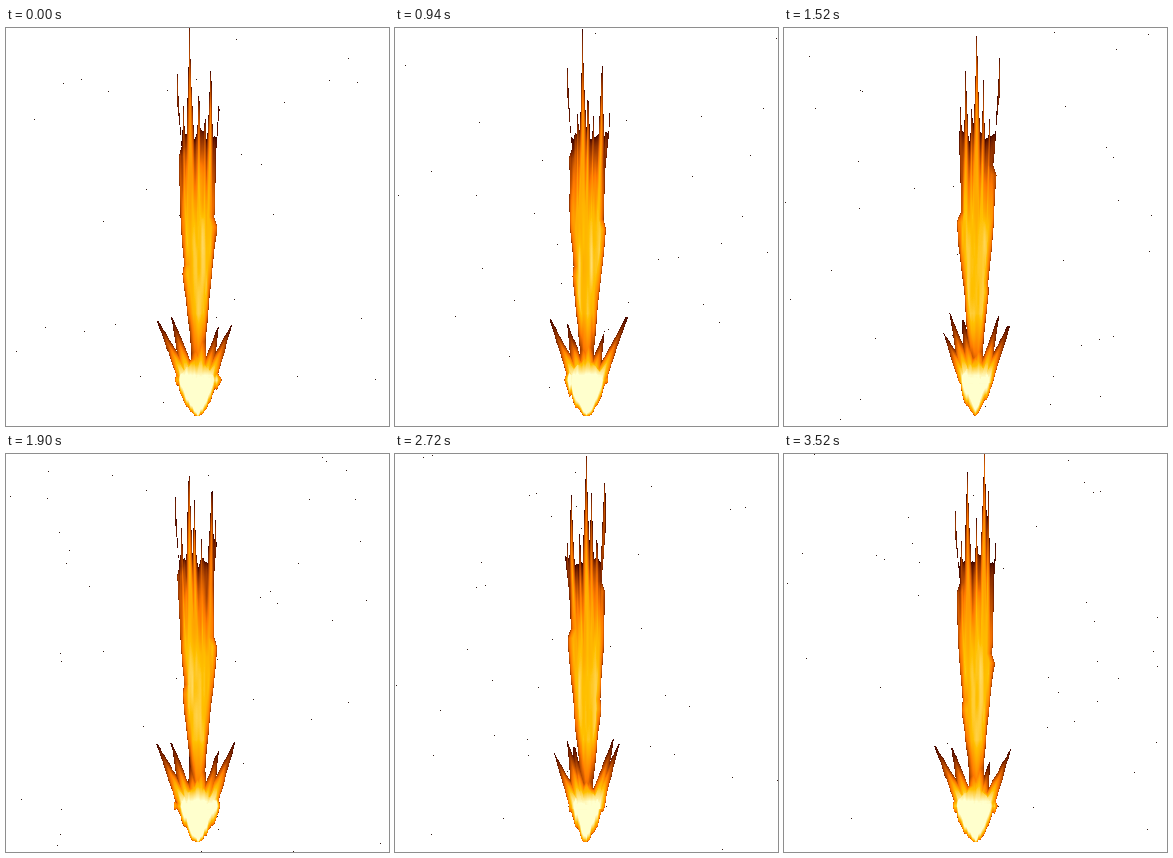
Animation of 383x398 px, one loop 3.54 s. Source, as an HTML page with a canvas:

```html
<!DOCTYPE html>
<html lang="en">
<head>
<meta charset="utf-8">
<title>Fire jet</title>
<style>
  html, body { margin: 0; width: 100%; height: 100%; overflow: hidden; background: #fff; }
  canvas { display: block; }
</style>
</head>
<body>
<canvas width="383" height="398"></canvas>
<script>
const W = 383, H = 398, LOOP = 3540, STEP = 20;
const LIVES = 15, CELLS = 2 * LIVES, CELL = 59;
const AXIS = 191.5, TONGUES = 7, SPIKES = 6;
const ctx = document.querySelector('canvas').getContext('2d');

const clamp = v => Math.max(0, Math.min(1, v));
const mix = (a, b, k) => a + (b - a) * k;
const smooth = k => k * k * (3 - 2 * k);

function hash(a, b) {
  let h = Math.imul(a + 101, 374761393) ^ Math.imul(b + 57, 668265263);
  h = Math.imul(h ^ (h >>> 13), 1274126177);
  return ((h ^ (h >>> 16)) >>> 0) / 4294967296;
}

// Tall, thin streaks that rise and repeat once per loop.
function streak(x, y, t, width) {
  const u = x / width, v = y / CELL + t * CELLS / LOOP;
  const i = Math.floor(u), j = Math.floor(v);
  const a = smooth(u - i), b = smooth(v - j);
  const row = k => mix(hash(i, k % CELLS), hash(i + 1, k % CELLS), a);
  return mix(row(j), row(j + 1), b);
}

// Dark brown through orange and gold to cream.
function colour(heat) {
  const h = clamp(heat);
  return [
    255 * Math.min(1, .2 + 1.55 * h),
    255 * h ** 1.13,
    205 * clamp((h - .78) / .22) ** .8
  ];
}
const palette = Array.from({ length: 256 }, (_, n) => colour(n / 255));

// Every part lives a short life, then starts again with new random numbers.
function life(i, t, seed) {
  const age = t * LIVES / LOOP + i * .618 + .6;
  const n = Math.floor(age) % LIVES + seed;
  return { p: age % 1, r: hash(n, i), s: hash(n + 200, i) };
}

// Tongues shoot up from the jet and thin out until they break off.
function tongue(i, t) {
  const { p, r, s } = life(i, t, 0);
  const spread = i / (TONGUES - 1) - .5;
  return {
    x: AXIS + 37 * spread * (1 + .2 * p) + (r - .5) * 4,
    y: 95 - 50 * p - 60 * p * p - 20 * s,
    sharp: 24 + 22 * p
  };
}

// Spikes burst out of the base and draw back into it.
function spike(i, t) {
  const { p, r, s } = life(i, t, 31);
  const side = 2 * i / (SPIKES - 1) - 1;
  const reach = .55 + .45 * Math.sqrt(Math.sin(Math.PI * p));
  return {
    x: AXIS + (40 * side + (r - .5) * 12) * reach,
    y: 350 - (56 + 16 * s) * reach
  };
}

const rim = edge => .25 + .75 * Math.sqrt(clamp(edge / 5));

function jetHeat(x, y, t, tongues, grain) {
  if (y > 340) return -1;
  const right = x > AXIS;
  const sway = 2 * Math.sin(t * 10 * Math.PI / LOOP) * clamp((200 - y) / 100);
  const notch = (y / (2 * CELL) + t * LIVES / LOOP + (right ? .4 : 0)) % 1;
  const ragged = 3.5 * clamp(notch * 12) * (1 - notch) - 1;
  const half = y < 190
    ? 17 + 8 * clamp((130 - y) / 130)
    : 17 - 12 * ((y - 190) / 150) ** 1.3;
  const edge = half + ragged * clamp((300 - y) / 80) - Math.abs(x - AXIS - sway) + (grain - .5) * 2;
  if (edge < 0) return -1;

  let depth = y - 108 + (grain - .5) * 30;
  for (const tip of tongues) {
    const v = y - tip.y;
    const ax = mix(tip.x, AXIS + (tip.x - AXIS) * .9, clamp(v / 120)) + sway;
    depth = Math.max(depth, v - tip.sharp * Math.abs(x - ax) ** .75 * (.8 + .4 * grain));
  }
  if (depth < 0) return -1;
  const body = .66 * Math.sqrt(clamp(depth / 90)) + .13 * clamp((y - 110) / 110)
    - .3 * clamp((y - 285) / 45);
  return Math.max(0, (body + (grain - .5) * .18) * rim(edge));
}

function baseHeat(x, y, t, spikes, grain) {
  let heat = -1;
  for (const tip of spikes) {
    const u = (y - tip.y) / (354 - tip.y);
    if (u < 0 || u > 1) continue;
    const ax = mix(tip.x, AXIS + (tip.x - AXIS) * .27, u);
    const edge = .7 + 7.5 * u - Math.abs(x - ax) + (grain - .5) * 2;
    if (edge > 0) heat = Math.max(heat, (.12 + .95 * u) * rim(edge));
  }
  if (y > 322 && y < 388) {
    const right = x > AXIS ? 1 : -1;
    const wide = 20 + 3 * right * Math.sin(t * 2 * LIVES * Math.PI / LOOP + right);
    const half = y < 352
      ? mix(2, wide, smooth((y - 322) / 30))
      : wide * ((388 - y) / 36) ** .62;
    const edge = half - Math.abs(x - AXIS + .5) + (grain - .5) * 6;
    if (edge > 0) {
      const glow = .5 + .5 * clamp((y - 322) / 25) + (grain - .5) * .3 * clamp((356 - y) / 20);
      heat = Math.max(heat, glow * rim(edge));
    }
  }
  return heat;
}

function draw(t) {
  const image = ctx.createImageData(W, H);
  const put = (x, y, [r, g, b]) => image.data.set([r, g, b, 255], 4 * (y * W + x));
  const tongues = Array.from({ length: TONGUES }, (_, i) => tongue(i, t));
  const spikes = Array.from({ length: SPIKES }, (_, i) => spike(i, t));

  const step = t / STEP, specks = 25 + 22 * hash(step, 5);
  for (let i = 0; i < specks; i++) {
    put(Math.floor(hash(step, i * 2 + 900) * W), Math.floor(hash(step, i * 2 + 901) * H), [45, 25, 20]);
  }

  for (let y = 0; y < 388; y++) {
    for (let x = 138; x < 246; x++) {
      const grain = .6 * streak(x, y, t, 4) + .4 * streak(x + 400, y * 2, t, 2);
      const heat = Math.max(jetHeat(x, y, t, tongues, grain), baseHeat(x, y, t, spikes, grain));
      if (heat >= 0) put(x, y, palette[Math.round(clamp(heat) * 255)]);
    }
  }
  ctx.putImageData(image, 0, 0);
}

let start, shown = -1;
function tick(now) {
  start ??= now;
  const t = Math.floor((now - start) % LOOP / STEP) * STEP;
  if (t !== shown) draw(shown = t);
  requestAnimationFrame(tick);
}
requestAnimationFrame(tick);
</script>
</body>
</html>
```
